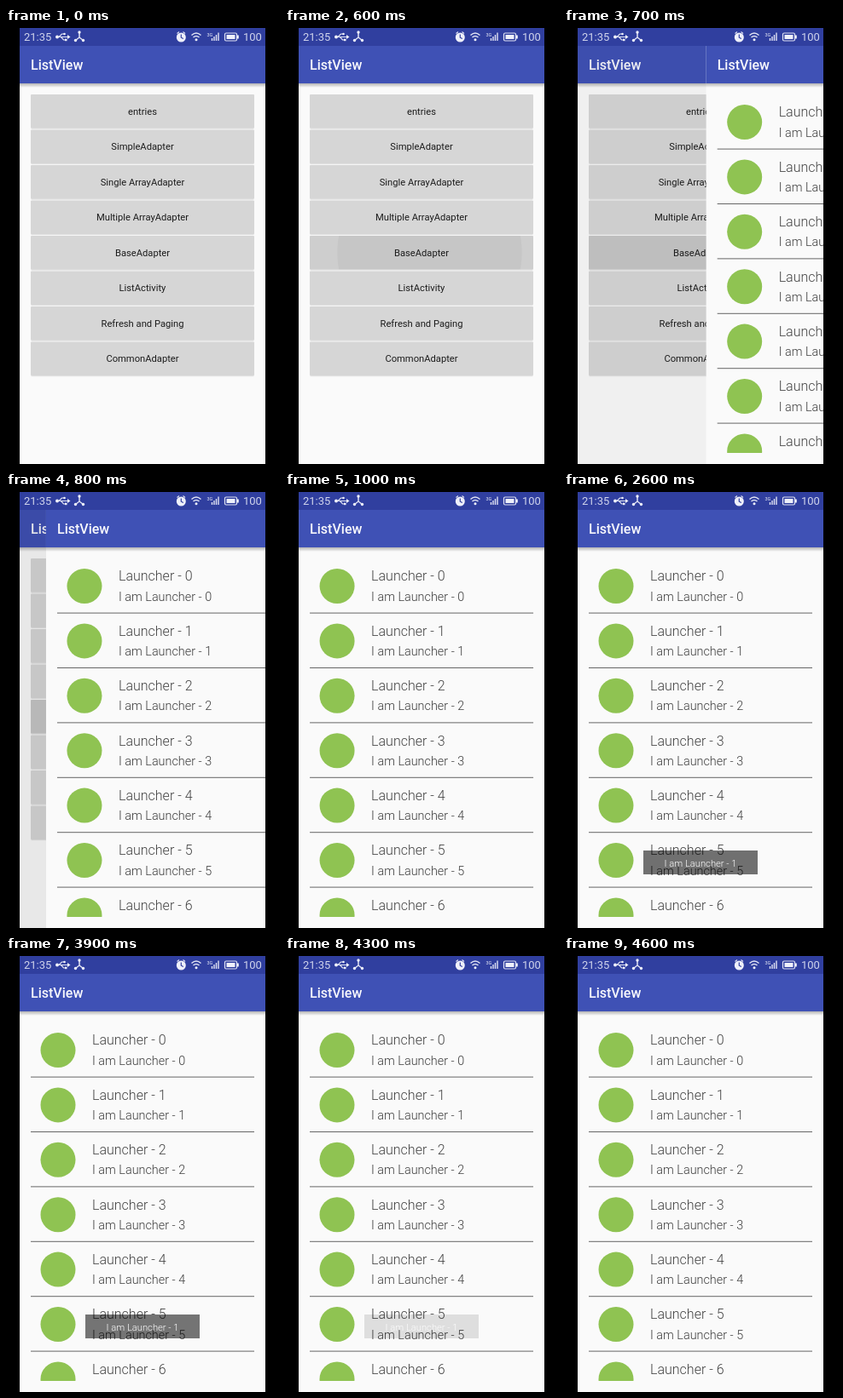
An HTML page that plays this animation: 320 by 512 pixels, repeating every 5300 ms.

```html
<!DOCTYPE html>
<html lang="en">
<head>
<meta charset="utf-8">
<title>ListView</title>
<style>
  html, body { margin: 0; width: 100%; height: 100%; overflow: hidden; background: #000; }
  svg { display: block; width: 100%; height: 100%; }
  text { font-family: Roboto, sans-serif; }
  .bar { font-size: 16px; font-weight: 500; fill: #f8f8fc; }
  .status { font-size: 13px; fill: #d0d4ec; }
  .button { font-size: 11.2px; fill: #1c1c1c; text-anchor: middle; }
  .title { font-size: 16px; font-weight: 300; fill: #444; }
  .sub { font-size: 14.4px; font-weight: 300; fill: #3c3c3c; }
  .toast { font-size: 11.2px; font-weight: 300; fill: #fff; text-anchor: middle; }
</style>
</head>
<body>
<svg id="stage" viewBox="0 0 320 512"></svg>
<script>
const LOOP = 5300, STEP = 100, WIDTH = 288;
const LABELS = ['entries', 'SimpleAdapter', 'Single ArrayAdapter', 'Multiple ArrayAdapter',
  'BaseAdapter', 'ListActivity', 'Refresh and Paging', 'CommonAdapter'];
const PITCH = 64.4, BUTTON_PITCH = 41.5, PRESSED = 4;

const repeat = (n, fn) => Array.from({ length: n }, (_, i) => fn(i)).join('');
const rect = (x, y, w, h, fill, extra = '') =>
  `<rect x="${x}" y="${y}" width="${w}" height="${h}" fill="${fill}" ${extra}/>`;
const text = (cls, x, y, s) => `<text class="${cls}" x="${x}" y="${y}">${s}</text>`;
const clip = (id, x, y, w, h) => `<clipPath id="${id}">${rect(x, y, w, h, '#000')}</clipPath>`;

const page = content =>
  rect(16, 21, WIDTH, 491, '#fafafa') + content +
  rect(16, 65, WIDTH, 5, 'url(#shade)') +
  rect(16, 21, WIDTH, 44, '#3f51b5') + text('bar', 29, 49, 'ListView');

const button = i => {
  const y = 78 + i * BUTTON_PITCH;
  return rect(29.5, y + 1, 261, 39.7, '#000', 'opacity=".1"') +
    rect(29, y, 262, 39.6, '#d6d6d6', 'rx="1"');
};
const buttonLabel = (s, i) => text('button', 160, 101.6 + i * BUTTON_PITCH, s);

const row = i => {
  const y = i * PITCH;
  return `<circle cx="61" cy="${110.5 + y}" r="20.5" fill="#8fc352"/>` +
    text('title', 101, 104.3 + y, `Launcher - ${i}`) +
    text('sub', 101, 127.6 + y, `I am Launcher - ${i}`) +
    rect(29, 141.6 + y, 262, 1, '#666');
};

const buttonTop = 78 + PRESSED * BUTTON_PITCH;
const rowTop = 142.4 + 0.2;

const statusBar = rect(16, 0, WIDTH, 21, '#303f9f') +
  text('status', 21, 15, '21:35') + text('status', 278, 15, '100') +
  `<g fill="none" stroke="#dfe2f3" stroke-width="1.2">
    <path d="M59 10.5H73M62 10.5L65.500 7H68M64.500 10.500L67.500 14H70"/>
    <path d="M86 4V11L81.500 14.500M86 11L90.500 14.500" stroke-width="1.5"/>
    <path d="M217.500 8.500Q223 3.500 228.500 8.500M219.500 11Q223 8 226.500 11" stroke-width="1.5"/>
    <path d="M241.500 15V12M244 15V10M246.500 15V8M249 15V5.500" stroke-width="1.4"/>
    <rect x="256.500" y="6" width="14" height="9" rx="1.500"/>
    <path d="M200.500 6.500L203 4.500M207.500 4.500L210 6.500"/>
  </g>
  <g fill="#eef0fa">
    <circle cx="60" cy="10.500" r="2"/><path d="M72 8L75.500 10.500L72 13Z"/>
    <circle cx="68.500" cy="7" r="1.300"/><rect x="69" y="12.700" width="2.500" height="2.500"/>
    <circle cx="86" cy="5" r="1.700"/><circle cx="81.500" cy="14.500" r="1.700"/><circle cx="90.500" cy="14.500" r="1.700"/>
    <circle cx="205.300" cy="11" r="5.500"/><circle cx="223" cy="13.800" r="1.500"/>
    <rect x="258.500" y="8" width="10" height="5"/><rect x="271" y="8.500" width="1.800" height="4"/>
    <text x="235.500" y="9.500" font-size="5.500">3G</text>
  </g>
  <path d="M205.300 7.500V11.200L207.800 12.500" fill="none" stroke="#303f9f" stroke-width="1.200"/>`;

const stage = document.getElementById('stage');
stage.innerHTML = `<defs>
    <linearGradient id="shade" x2="0" y2="1">
      <stop stop-color="#000" stop-opacity=".28"/><stop offset="1" stop-color="#000" stop-opacity="0"/>
    </linearGradient>
    ${clip('screen', 16, 0, WIDTH, 512)}${clip('list', 16, 78, WIDTH, 421)}
    ${clip('buttonClip', 29, buttonTop, 262, 39.6)}${clip('rowClip', 29, rowTop, 262, 63.4)}
  </defs>
  ${rect(0, 0, 320, 512, '#000')}
  <g clip-path="url(#screen)">
    ${page(repeat(LABELS.length, button) +
      `<g clip-path="url(#buttonClip)">
        ${rect(29, buttonTop, 262, 40, '#000', 'id="press"')}
        <circle id="buttonRipple" cx="169.5" cy="${buttonTop + 20}" opacity=".04"/>
      </g>` + LABELS.map(buttonLabel).join(''))}
    ${rect(16, 21, WIDTH, 491, '#000', 'id="dim"')}
    <g id="detail">${page(`
      <g clip-path="url(#rowClip)"><circle id="rowRipple" cx="173" cy="${rowTop + 31.7}"/></g>
      <g clip-path="url(#list)">${repeat(7, row)}</g>`)}
    </g>
    <g id="toast">${rect(93, 421, 134, 28, '#000', 'opacity=".55"')}
      ${text('toast', 160, 440, 'I am Launcher - 1')}</g>
    ${statusBar}
  </g>`;

const set = (id, attrs) => {
  const el = document.getElementById(id);
  for (const k in attrs) el.setAttribute(k, attrs[k]);
};
const ramp = (t, from, to) => Math.min(1, Math.max(0, (t - from) / (to - from)));

function draw(t) {
  set('press', { opacity: 0.04 * ramp(t, 250, 500) });
  set('buttonRipple', { r: 142 * ramp(t, 280, 700) });

  const offset = WIDTH * (1 - ramp(t, 650, 1100)) ** 5.5;
  set('detail', { transform: `translate(${offset} 0)` });
  set('dim', { opacity: 0.08 * (1 - offset / WIDTH) });

  set('rowRipple', {
    r: 140 * ramp(t, 1560, 2200),
    opacity: 0.053 * ramp(t, 1500, 1700) * (1 - ramp(t, 2050, 2400))
  });
  set('toast', { opacity: ramp(t, 1950, 2450) * (1 - ramp(t, 3890, 4400)) });
}

function tick() {
  const t = performance.now() % LOOP;
  draw(Math.floor(t / STEP) * STEP);
  requestAnimationFrame(tick);
}
tick();
</script>
</body>
</html>
```
